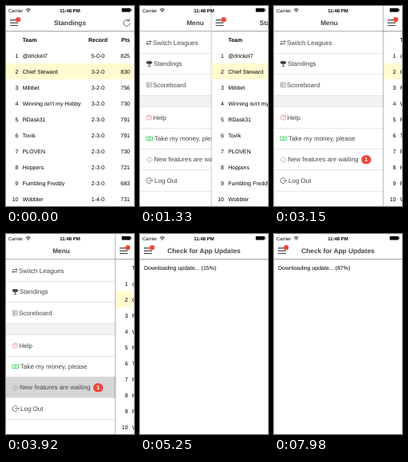
An HTML page for the animation above (8000 ms loop, 160 by 251 pixels).

```html
<!DOCTYPE html>
<html lang="en">
<head>
<meta charset="utf-8">
<title>Standings app</title>
<style>
  html, body { margin: 0; width: 100%; height: 100%; overflow: hidden; background: #fff; }
  svg { display: block; width: 160px; height: 251px; }
  text { font: 7px "Liberation Sans", Arial, sans-serif; text-rendering: geometricPrecision; fill: #000; }
  .title { font-size: 8.3px; font-weight: bold; fill: #444; text-anchor: middle; }
  .item { font-size: 8px; fill: #444; }
  .bold { font-weight: bold; }
  .mid { text-anchor: middle; }
  .end { text-anchor: end; }
  .status { font-size: 6px; }
  .line { fill: none; stroke: #444; stroke-width: .8; }
</style>
</head>
<body>
<svg viewBox="0 0 160 251">
  <g id="menu">
    <rect width="160" height="251" fill="#fff"/>
    <text class="title" x="69" y="24">Menu</text>
    <rect y="31" width="160" height="1" fill="#b2b2b2"/>
    <rect y="112" width="160" height="14" fill="#f2f2f2"/>
    <rect id="pressed" y="179" width="160" height="26" fill="#d6d6d6"/>
    <g id="items"></g>
    <g class="line">
      <path d="M8 44.7h6m-1.5-1.5 1.5 1.5-1.5 1.5M14 47.5H8m1.5-1.5L8 47.5l1.5 1.5"/>
      <path d="M9.5 69.5h4v2.3q-2 3-4 0zM11.5 73v2.5M9.5 75.7h4M9.5 70H8q0 2.5 2 2.5M13.5 70H15q0 2.5-2 2.5" fill="#444"/>
      <path d="M8.3 96h6v6h-6zM8.3 98h6M8.3 100h6M10.3 96v6" stroke="#888" stroke-width=".6"/>
      <g stroke="#ef6a60"><circle cx="11.5" cy="140" r="3.2" stroke-width=".6"/><path d="M10.4 139.2q.2-1.2 1.2-1.1 1.2.2.9 1.2l-.9.9v.6m0 .6v.6" stroke-width=".6"/></g>
      <g stroke="#33cd5f"><path d="M8 164h7.5v4.5H8z"/><circle cx="11.7" cy="166.2" r="1.2"/></g>
      <path d="M10 194.5H9q-1.6-.8-.8-2.3.8-.8 1.4-.5.5-2 2.4-1.8 1.7.2 2 2 1.6.2 1.5 1.5-.3 1.2-2 1.1M11.8 192.3v4m-1.3-1.3 1.3 1.3 1.3-1.3" stroke="#7aa5d8" stroke-width=".6"/>
      <path d="M14 216.7a3.4 3.4 0 1 0 0 4.6M11 219h4.7m-1.4-1.4 1.4 1.4-1.4 1.4" stroke-width=".7"/>
    </g>
    <rect x="109" y="187.3" width="12.4" height="11" rx="5.5" fill="#ef473a"/>
    <text class="bold mid" x="115.2" y="195.4" style="fill:#fff">1</text>
  </g>

  <g id="page">
    <rect x="-1.2" width="1.2" height="251" fill="#000" opacity=".12"/>
    <rect x="-.5" width=".7" height="251" fill="#000" opacity=".3"/>
    <rect width="160" height="251" fill="#fff"/>
    <text id="title" class="title" x="80" y="24"></text>
    <path d="M5 17.7h10M5 21.1h10M5 24.5h10" class="line" style="stroke-width:1.2"/>
    <circle cx="15.2" cy="17" r="3.1" fill="#ef473a"/>
    <rect y="31" width="160" height="1" fill="#b2b2b2"/>
    <rect y="32" width="160" height="1" fill="#ececec"/>
    <g id="standings">
      <path d="M153.6 18.2A4 4 0 1 0 155 21.2M154.2 15.8v3h-3" class="line"/>
      <rect y="72" width="160" height="20" fill="#fffbcf"/>
    </g>
    <text id="progress" x="5" y="45"></text>
  </g>

  <g id="statusBar">
    <text class="status" x="3" y="7.5">Carrier</text>
    <path d="M24.8 4.6q3-2.6 6 0M25.9 5.9q1.9-1.6 3.8 0" fill="none" stroke="#000" stroke-width=".8"/>
    <circle cx="27.8" cy="7" r=".7"/>
    <text class="status bold mid" x="80" y="7.5">11:48 PM</text>
    <rect x="144.7" y="2.8" width="11" height="4.8" rx=".8"/>
    <rect x="156.1" y="4.3" width=".8" height="1.8"/>
  </g>
</svg>
<script>
const $ = id => document.getElementById(id);
const LOOP = 8000;

function add(parent, name, attrs, content = '') {
  const node = document.createElementNS('http://www.w3.org/2000/svg', name);
  for (const key in attrs) node.setAttribute(key, attrs[key]);
  node.textContent = content;
  $(parent).append(node);
}

// Menu rows: label, left edge, centre
[
  ['Switch Leagues', 16, 46], ['Standings', 17, 72.5], ['Scoreboard', 16, 99],
  ['Help', 16.5, 140], ['Take my money, please', 18, 166.3],
  ['New features are waiting', 17.3, 192.5], ['Log Out', 18, 219]
].forEach(([label, x, y]) => {
  add('items', 'text', { class: 'item', x, y: y + 2.8 }, label);
  add('items', 'rect', { y: Math.round(y + 12.8), width: 160, height: .7, fill: '#ddd' });
});
add('items', 'rect', { y: 126, width: 160, height: .7, fill: '#ddd' });

function addRow(y, rank, team, record, points, style = '') {
  const cell = (x, align, value) => add('standings', 'text', { x, y, class: `${align} ${style}` }, value);
  cell(15.5, 'end', rank);
  cell(20.7, '', team);
  cell(115, 'mid', record);
  cell(155, 'end', points);
}

addRow(44.6, '', 'Team', 'Record', 'Pts', 'bold');
[
  ['@drickel7', '5-0-0', 825], ['Chief Steward', '3-2-0', 830],
  ['Mibbet', '3-2-0', 756], ["Winning isn't my Hobby", '3-2-0', 730],
  ['RDask31', '2-3-0', 791], ['Tovik', '2-3-0', 791],
  ['PLOVEN', '2-3-0', 730], ['Hoppers', '2-3-0', 721],
  ['Fumbling Freddy', '2-3-0', 683], ['Wobbler', '1-4-0', 731]
].forEach((row, i) => addRow(64.6 + 20 * i, i + 1, ...row));

// Stepped timelines: [start time, value]
const slide = [[0, 0], [1260, 30], [1330, 89.5], [1400, 137], [4200, 48], [4340, 0]];
const percent = [
  [0, 0], [4830, 1], [4900, 1.5], [5250, 15], [5320, 16], [5460, 22.5], [5530, 31],
  [5600, 44.5], [5880, 51], [6090, 58.5], [6300, 60.5], [6440, 65], [6580, 67],
  [6930, 67.5], [7350, 68], [7420, 68.5], [7560, 80.5], [7700, 82], [7770, 85.5], [7980, 87]
];
const valueAt = (steps, t) => steps.findLast(([start]) => t >= start)[1];
const show = (id, visible) => $(id).setAttribute('visibility', visible ? 'visible' : 'hidden');

function draw(now) {
  const t = now % LOOP;
  const updating = t >= 4200;
  $('page').setAttribute('transform', `translate(${valueAt(slide, t)})`);
  $('title').textContent = updating ? 'Check for App Updates' : 'Standings';
  $('progress').textContent = `Downloading update... (${valueAt(percent, t)}%)`;
  show('standings', !updating);
  show('progress', updating);
  show('pressed', t >= 3920 && !updating);
  requestAnimationFrame(draw);
}
draw(0);
</script>
</body>
</html>
```
